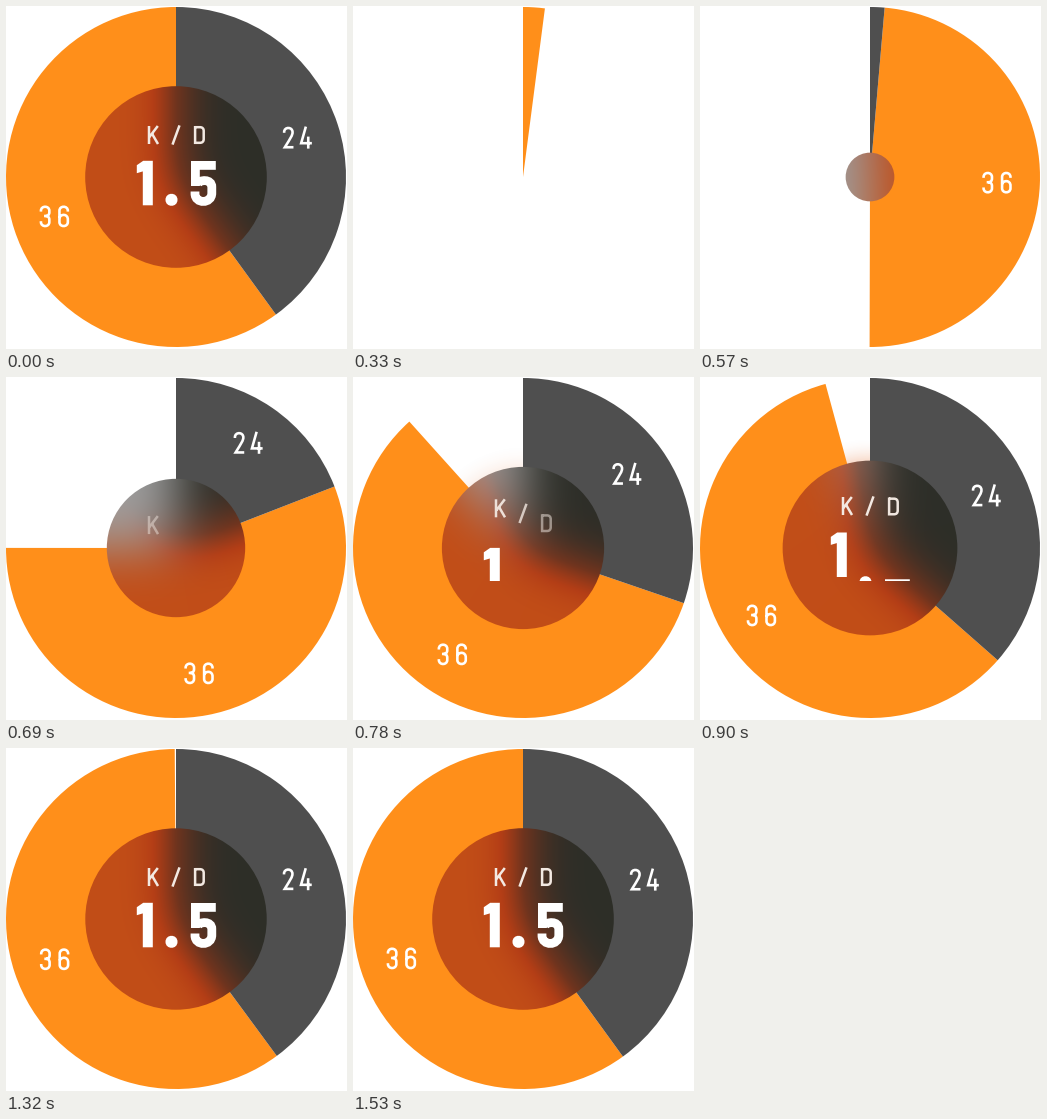
A matplotlib script that plays this animation: 341 by 343 pixels, repeating every 4.5 s.

```python
import numpy as np
import matplotlib.pyplot as plt
from matplotlib.animation import FuncAnimation
from matplotlib.patches import Circle, PathPatch, Rectangle, Wedge
from matplotlib.path import Path
from matplotlib.transforms import Affine2D

W, H, DPI, STEP, FRAMES = 341, 343, 64, 30, 150
CX, CY, R, HUB = 170, 171, 170, 90.8
ORANGE, GRAY = "#ff8f1a", "#4f4f4f"
PX = 72 / DPI

# Condensed lettering drawn with strokes: (path, width, height)
GLYPHS = {
    "3": ("M1.3 6.2 L1.3 5.4 C1.3 0 9.7 0 9.7 5.4 L9.7 6.8 "
          "C9.7 9.4 8.2 10.6 6 10.6 L4.4 10.6 "
          "M6 10.6 C8.2 10.6 9.7 11.8 9.7 14.4 L9.7 16.6 "
          "C9.7 22 1.3 22 1.3 16.6 L1.3 15.8", 11, 22),
    "6": ("M9.7 6.2 L9.7 5.4 C9.7 0 1.3 0 1.3 5.4 L1.3 16.6 "
          "C1.3 22 9.7 22 9.7 16.6 L9.7 14 C9.7 8.4 2.8 8.2 1.3 12.4", 11, 22),
    "2": ("M1.3 6.2 L1.3 5.4 C1.3 0 9.7 0 9.7 5.6 "
          "C9.7 8.8 7.8 11.2 2 20.65 L10.6 20.65", 11, 22),
    "4": ("M6 0 L1.3 16.6 L12 16.6 M8.4 10 L8.4 22", 12, 22),
    "K": ("M1.2 0 L1.2 18 M10 0 L1.6 11 M4.4 8 L10.2 18", 11, 18),
    "/": ("M1 18.6 L8 -0.6", 9, 18),
    "D": ("M1.2 1.2 L6 1.2 C8.6 1.2 9.8 2.6 9.8 5 L9.8 13 "
          "C9.8 15.4 8.6 16.8 6 16.8 L1.2 16.8 L1.2 0", 11, 18),
    "1": ("M6.4 0 L16 0 L16 44.5 L6 44.5 L6 10.6 L0 12.4 L0 4.4 L6.4 0", 16, 45),
    ".": ("M0 6 C0 -2 12 -2 12 6 C12 14 0 14 0 6", 12, 12),
    "5": ("M25.8 4.4 L5.4 4.4 L5.4 25 "
          "M7.5 23 C9.5 18.4 21.8 17.6 21.8 26 L21.8 32 "
          "C21.8 43.2 5 43.2 5 32.5 L5 30.5", 27, 45),
}


def outline(spec):
    verts, codes = [], []
    kinds = {"M": (Path.MOVETO, 1), "L": (Path.LINETO, 1), "C": (Path.CURVE4, 3)}
    tokens = spec.split()
    i = 0
    while i < len(tokens):
        code, count = kinds[tokens[i][0]]
        nums = [float(v) for v in [tokens[i][1:]] + tokens[i + 1:i + 2 * count]]
        verts += list(zip(nums[::2], nums[1::2]))
        codes += [code] * count
        i += 2 * count
    return Path(verts, codes)


class Glyph:
    def __init__(self, char, x, y, width, color="white", filled=False):
        spec, w, h = GLYPHS[char]
        path = Affine2D().translate(-w / 2, -h / 2).transform_path(outline(spec))
        self.home = x, y
        self.shift = Affine2D()
        self.patch = PathPatch(path, fill=filled, fc=color, ec=color,
                               lw=0 if filled else width * PX,
                               capstyle="butt", joinstyle="miter", zorder=5,
                               transform=self.shift + ax.transData)
        ax.add_patch(self.patch)

    def place(self, dx=0, dy=0, alpha=1):
        self.shift.clear().translate(self.home[0] + dx, self.home[1] + dy)
        self.patch.set_alpha(alpha)
        self.patch.set_visible(alpha > 0)


def swell(t):
    """Slow start, then an exponential settle; t in ms after the start."""
    if t <= 0:
        return 0.0
    if t < 230:
        x = t / 230
        return 0.012 * x + 0.255 * x ** 5.3
    return 1 - 0.733 * np.exp(-(t - 230) / 118)


def ease_out(t, length):
    return 1 - (1 - np.clip(t / length, 0, 1)) ** 3


fig = plt.figure(figsize=(W / DPI, H / DPI), dpi=DPI, facecolor="white")
ax = fig.add_axes([0, 0, 1, 1])
ax.set_xlim(0, W)
ax.set_ylim(H, 0)
ax.axis("off")

# Coarse grid around the hub, used to blur the pie behind it
SPAN, CELL, SIGMA = 140, 2, 25
axis = np.arange(-SPAN + CELL / 2, SPAN, CELL)
gx, gy = np.meshgrid(axis, axis)
bearing = np.degrees(np.arctan2(gx, -gy)) % 360
kernel = np.exp(-((axis[:, None] - axis) / SIGMA) ** 2 / 2)
kernel /= kernel.sum(axis=1, keepdims=True)
box = (CX - SPAN, CX + SPAN, CY + SPAN, CY - SPAN)

SHARES = [0, 0.5, 0.82, 1]
TINTS = np.array([(45, 46, 40), (112, 52, 30), (180, 62, 22), (194, 78, 24)]) / 255
PALE = np.array([158, 158, 158]) / 255


def blur(mask):
    return kernel @ mask.astype(float) @ kernel.T


def glass(a, b):
    dark = blur(bearing < a)
    warm = blur((bearing >= a) & (bearing < b))
    share = warm / np.maximum(dark + warm, 1e-6)
    tint = np.stack([np.interp(share, SHARES, TINTS[:, k]) for k in range(3)], -1)
    solid = np.clip(dark + warm, 0, 1)[..., None]
    return np.clip(tint * solid + PALE * (1 - solid), 0, 1)


def halo(radius, strength):
    rgba = np.empty(gx.shape + (4,))
    rgba[..., :3] = 0.9, 0.45, 0.2
    gap = np.clip((np.hypot(gx, gy) - radius) / 24, 0, 1)
    rgba[..., 3] = strength * (1 - gap) ** 2
    return rgba


blank = np.zeros(gx.shape + (4,))
glow = ax.imshow(blank, extent=box, interpolation="bilinear", zorder=1, aspect="auto")
warm_slice = Wedge((CX, CY), R, -90, -89, fc=ORANGE, lw=0, zorder=2)
dark_slice = Wedge((CX, CY), R, -90, -89, fc=GRAY, lw=0, zorder=2)
ax.add_patch(warm_slice)
ax.add_patch(dark_slice)
hub_edge = Circle((CX, CY), HUB, transform=ax.transData)
hub = ax.imshow(np.ones(gx.shape + (3,)), extent=box, interpolation="bilinear",
                zorder=3, aspect="auto")
ax.set_xlim(0, W)
ax.set_ylim(H, 0)

warm_label = [Glyph("3", -9.6, 0, 2.6), Glyph("6", 8.9, 0, 2.6)]
dark_label = [Glyph("2", -8.9, 0, 2.6), Glyph("4", 8.6, 0, 2.6)]
title = [Glyph(c, x, 129, 2.5, "#f3e9e2") for c, x in zip("K/D", (147.3, 170, 193.4))]
ratio = [Glyph("1", 138.8, 177.3, 0, filled=True),
         Glyph(".", 165.5, 193.8, 0, filled=True),
         Glyph("5", 197.5, 177.5, 8.8)]
floor = Rectangle((0, 0), W, 204, transform=ax.transData)
for glyph in ratio:
    glyph.patch.set_clip_path(floor)


def set_slice(wedge, label, start, end, age):
    wedge.set_theta1(start - 90)
    wedge.set_theta2(end - 90)
    wedge.set_visible(end > start)
    mid = np.radians((start + end) / 2)
    alpha = float(np.clip((age - 180) / 80, 0, 1))
    for glyph in label:
        glyph.place(CX + 127.5 * np.sin(mid), CY - 127.5 * np.cos(mid), alpha)


def draw(n):
    t = n * STEP if 0 < n < 51 else 9000
    a = 144 * swell(t - 420)
    b = a + 216 * swell(t - 180)
    set_slice(dark_slice, dark_label, 0, a, t - 420)
    set_slice(warm_slice, warm_label, a, b, t - 180)

    radius = HUB * swell(t - 370) ** 0.65
    hub.set_visible(radius > 0)
    if radius > 0:
        hub_edge.set_radius(radius)
        hub.set_clip_path(hub_edge)
        hub.set_data(glass(a, b))
    glow.set_visible(300 < b < 359.5)
    if glow.get_visible():
        glow.set_data(halo(radius, 0.25 * min(1, (b - 300) / 45)))

    for i, glyph in enumerate(title):
        p = float(ease_out(t - 648 - 42 * i, 220))
        glyph.place(dy=36 * (1 - p), alpha=p)
    for i, glyph in enumerate(ratio):
        p = float(ease_out(t - 695 - 100 * i, 270))
        glyph.place(dy=50 * (1 - p), alpha=1 if p > 0 else 0)
    return []


anim = FuncAnimation(fig, draw, frames=FRAMES, interval=STEP,
                     repeat=True, repeat_delay=0, blit=False)
plt.show()
```
